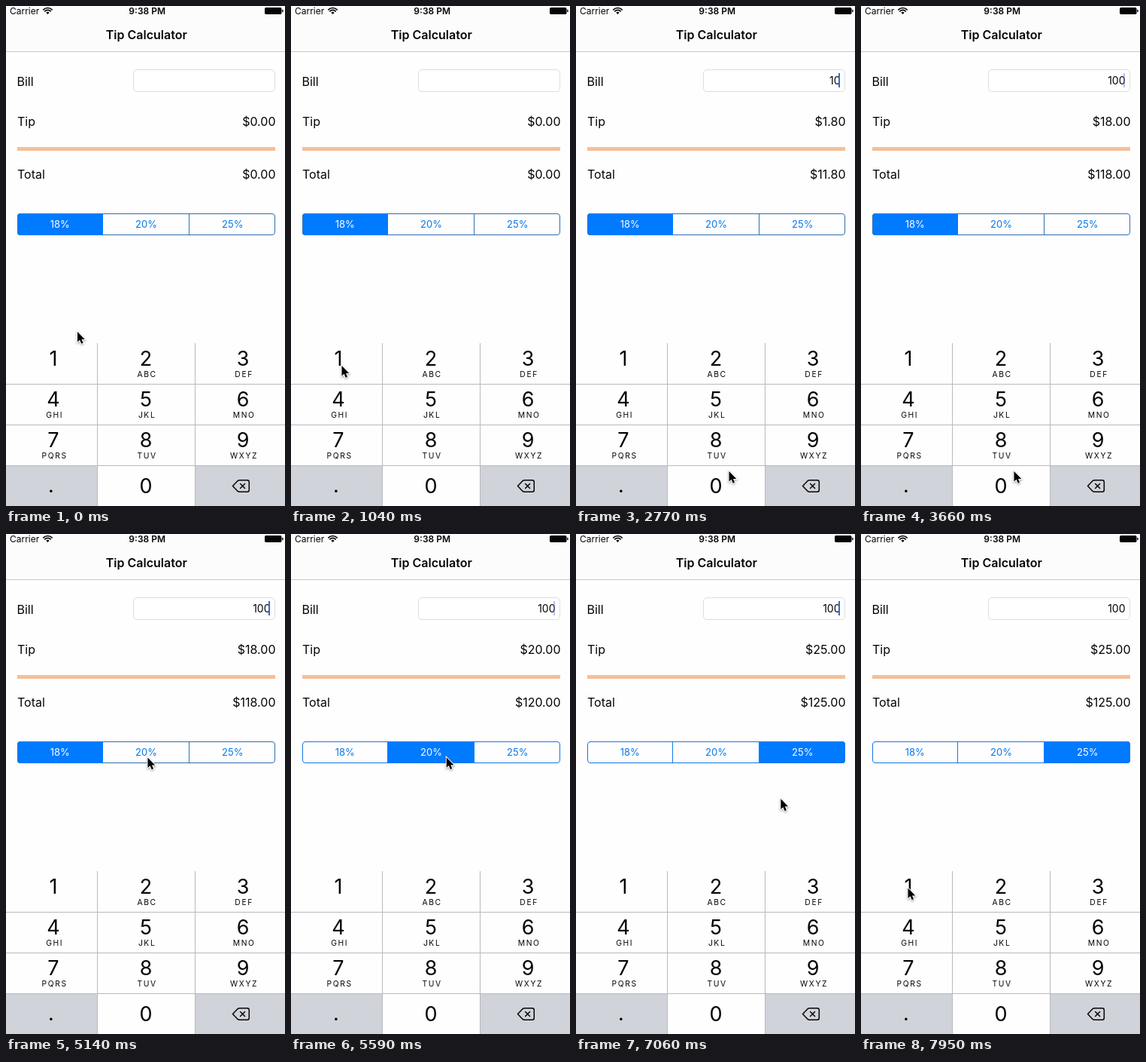
An HTML page with a canvas that plays this animation: 371 by 663 pixels, repeating every 8 s.

```html
<!DOCTYPE html>
<html lang="en">
<head>
<meta charset="utf-8">
<title>Tip Calculator</title>
<style>
html, body { margin: 0; width: 100%; height: 100%; overflow: hidden; background: #fefefe; }
canvas { display: block; width: 371px; height: 663px; }
</style>
</head>
<body>
<canvas id="stage"></canvas>
<script>
const W = 371, H = 663, LOOP = 8000;
const BLUE = '#007aff', INK = '#050505', GREY = '#d0d3da', PAPER = '#fefefe';
const canvas = document.getElementById('stage');
const ctx = canvas.getContext('2d');
const ratio = window.devicePixelRatio || 1;
canvas.width = W * ratio;
canvas.height = H * ratio;

const tickAt = ms => Math.floor((ms + 40) / 147.5);

const pointerPath = [
  [0, 95, 432], [2, 80, 460], [4, 43.5, 481], [6, 60, 479], [7, 67.5, 477],
  [12, 67.5, 477], [13, 85, 497], [15, 165, 582], [17, 203.5, 617],
  [27, 203.5, 617], [29, 204, 570], [33, 195, 350], [35, 188.5, 296.5],
  [37, 188.5, 296.5], [39, 225, 296], [42, 306, 292],
  [47, 306, 292], [50, 205, 470], [51, 150, 535], [52, 105, 549], [53, 72, 510],
  [54, 62.5, 469.5]
];
const caretSpans = [[1, 4], [8, 15], [19, 25], [28, 31], [35, 38], [42, 45], [48, 51]];
const bills = [[0, ''], [11, '1'], [18, '10'], [21, '100']];
const choices = [[0, 0], [37, 1], [45, 2]];
const rates = [18, 20, 25];
const keyColumns = [[0, 121, 63], [122, 129, 186], [252, 119, 315]];
const letters = ['', 'ABC', 'DEF', 'GHI', 'JKL', 'MNO', 'PQRS', 'TUV', 'WXYZ'];

function latest(list, tick) {
  let value;
  for (const [start, v] of list) if (tick >= start) value = v;
  return value;
}

function pointerAt(tick) {
  const i = pointerPath.findIndex(p => p[0] >= tick);
  if (i < 0) return pointerPath[pointerPath.length - 1].slice(1);
  if (i === 0) return pointerPath[0].slice(1);
  const [t0, x0, y0] = pointerPath[i - 1], [t1, x1, y1] = pointerPath[i];
  const k = (tick - t0) / (t1 - t0);
  return [x0 + (x1 - x0) * k, y0 + (y1 - y0) * k];
}

function caretAlpha(tick) {
  const span = caretSpans.find(([a, b]) => tick >= a && tick <= b);
  if (!span) return 0;
  return tick === span[1] ? 0.4 : 1;
}

function rect(x, y, w, h, color) {
  ctx.fillStyle = color;
  ctx.fillRect(x, y, w, h);
}

function text(str, x, y, size, { align = 'left', color = INK, weight = 400, spacing = 0 } = {}) {
  ctx.font = `${weight} ${size}px Inter, sans-serif`;
  ctx.textAlign = align;
  ctx.letterSpacing = spacing + 'px';
  ctx.fillStyle = color;
  ctx.fillText(str, x, y);
}

function roundBox(x, y, w, h, r) {
  ctx.beginPath();
  ctx.roundRect(x, y, w, h, r);
}

function polyline(points) {
  ctx.beginPath();
  for (const [x, y] of points) ctx.lineTo(x, y);
}

function drawStatusBar() {
  rect(0, 0, W, 60, '#fcfcfc');
  rect(0, 60, W, 1, '#c8c8c9');
  text('Carrier', 5, 11, 12);
  text('9:38 PM', 187.7, 11, 12, { align: 'center', weight: 600 });

  ctx.strokeStyle = INK;
  ctx.lineWidth = 1.7;
  for (const r of [5.2, 8]) {
    ctx.beginPath();
    ctx.arc(55.5, 10.5, r, -Math.PI * 0.75, -Math.PI * 0.25);
    ctx.stroke();
  }
  ctx.beginPath();
  ctx.moveTo(55.5, 11);
  ctx.arc(55.5, 11, 3.1, -Math.PI * 0.75, -Math.PI * 0.25);
  ctx.fillStyle = INK;
  ctx.fill();

  roundBox(344, 2, 22.5, 9, 1.8);
  ctx.fill();
  roundBox(367.2, 4.8, 1.4, 3.4, 0.7);
  ctx.fill();

  text('Tip Calculator', 186.8, 44, 16, { align: 'center', weight: 600 });
}

function drawForm(tick) {
  const bill = latest(bills, tick);
  const rate = rates[latest(choices, tick)];
  const tip = Number(bill) * rate / 100;
  const money = n => '$' + n.toFixed(2);

  text('Bill', 14.5, 105.5, 16);
  text('Tip', 15, 158.5, 16);
  text('Total', 15, 228.5, 16);
  text(money(tip), 358.5, 158.5, 16, { align: 'right' });
  text(money(Number(bill) + tip), 358.5, 228.5, 16, { align: 'right' });
  rect(15, 187, 343, 5, '#f4bf9a');

  roundBox(169.5, 84.5, 188, 29, 4.5);
  ctx.fillStyle = '#fff';
  ctx.fill();
  ctx.strokeStyle = '#dedede';
  ctx.lineWidth = 1;
  ctx.stroke();
  text(bill, 351.5, 104, 14, { align: 'right' });

  ctx.globalAlpha = caretAlpha(tick);
  rect(349, 89, 2, 19, '#4263d8');
  ctx.globalAlpha = 1;
}

function drawSegments(tick) {
  const chosen = latest(choices, tick);
  const pressed = tick === 36 ? 1 : tick === 44 ? 2 : -1;
  const edges = [15, 129, 243.5, 358];
  const line = chosen === 0 ? '#2f6fb3' : '#1277e6';

  ctx.save();
  roundBox(15, 275, 343, 29, 4);
  ctx.clip();
  rates.forEach((rate, i) => {
    const on = i === chosen;
    const fill = on ? BLUE : i === pressed ? '#d7e8fd' : PAPER;
    rect(edges[i], 275, edges[i + 1] - edges[i], 29, fill);
  });
  ctx.restore();

  ctx.lineWidth = 1;
  ctx.strokeStyle = line;
  roundBox(15.5, 275.5, 342, 28, 3.5);
  ctx.stroke();
  rect(128, 275, 1, 29, chosen < 2 ? BLUE : line);
  rect(243, 275, 1, 29, chosen > 0 ? BLUE : line);
  if (chosen === 0) rect(18, 275, 110, 29, BLUE);

  rates.forEach((rate, i) => {
    text(rate + '%', [71.7, 186.5, 301.2][i], 294, 13,
      { align: 'center', color: i === chosen ? '#fff' : '#0878e8' });
  });
}

function drawBackspace() {
  ctx.strokeStyle = INK;
  ctx.lineWidth = 1.5;
  ctx.lineJoin = ctx.lineCap = 'round';
  ctx.beginPath();
  ctx.moveTo(301.5, 636.5);
  ctx.lineTo(308.2, 629.6);
  ctx.quadraticCurveTo(309.2, 628.7, 310.5, 628.7);
  ctx.lineTo(320.8, 628.7);
  ctx.quadraticCurveTo(323.3, 628.7, 323.3, 631.2);
  ctx.lineTo(323.3, 641.8);
  ctx.quadraticCurveTo(323.3, 644.3, 320.8, 644.3);
  ctx.lineTo(310.5, 644.3);
  ctx.quadraticCurveTo(309.2, 644.3, 308.2, 643.4);
  ctx.closePath();
  ctx.stroke();
  for (const d of [-1, 1]) {
    polyline([[311.6, 636.5 - 3 * d], [317.6, 636.5 + 3 * d]]);
    ctx.stroke();
  }
}

function drawKeypad(tick) {
  rect(0, 610, 121, 53, GREY);
  rect(252, 610, 119, 53, GREY);
  if (tick === 11) rect(0, 447, 121, 54, GREY);
  if (tick === 18) rect(122, 610, 129, 53, GREY);

  for (const x of [121, 251]) rect(x, 447, 1, 216, '#b9babd');
  for (const y of [501, 555, 609]) rect(0, y, W, 1, '#b9babd');

  letters.forEach((label, i) => {
    const x = keyColumns[i % 3][2], y = 477 + 54 * Math.floor(i / 3);
    text(String(i + 1), x, y, 27, { align: 'center' });
    text(label, x + 1.6, y + 15, 10.3, { align: 'center', spacing: 1.6 });
  });
  text('0', 186, 646, 27, { align: 'center' });
  text('.', 59.8, 645, 27, { align: 'center' });
  drawBackspace();
}

function drawPointer(tick) {
  const [x, y] = pointerAt(tick);
  ctx.save();
  ctx.translate(x, y);
  polyline([[0, 0], [0, 13.6], [3.1, 10.8], [5.2, 15.8], [7.6, 14.8], [5.5, 9.9], [9.8, 9.9]]);
  ctx.closePath();
  ctx.lineJoin = 'miter';
  ctx.lineWidth = 2;
  ctx.strokeStyle = '#fff';
  ctx.shadowColor = 'rgba(0,0,0,.4)';
  ctx.shadowBlur = 2.5 * ratio;
  ctx.shadowOffsetY = ratio;
  ctx.stroke();
  ctx.shadowColor = 'transparent';
  ctx.fillStyle = '#000';
  ctx.fill();
  ctx.restore();
}

function draw(ms) {
  const tick = tickAt(ms % LOOP);
  ctx.setTransform(ratio, 0, 0, ratio, 0, 0);
  rect(0, 0, W, H, PAPER);
  drawStatusBar();
  drawForm(tick);
  drawSegments(tick);
  drawKeypad(tick);
  drawPointer(tick);
}

const start = performance.now();
function frame() {
  draw(performance.now() - start);
  requestAnimationFrame(frame);
}
frame();
</script>
</body>
</html>
```
